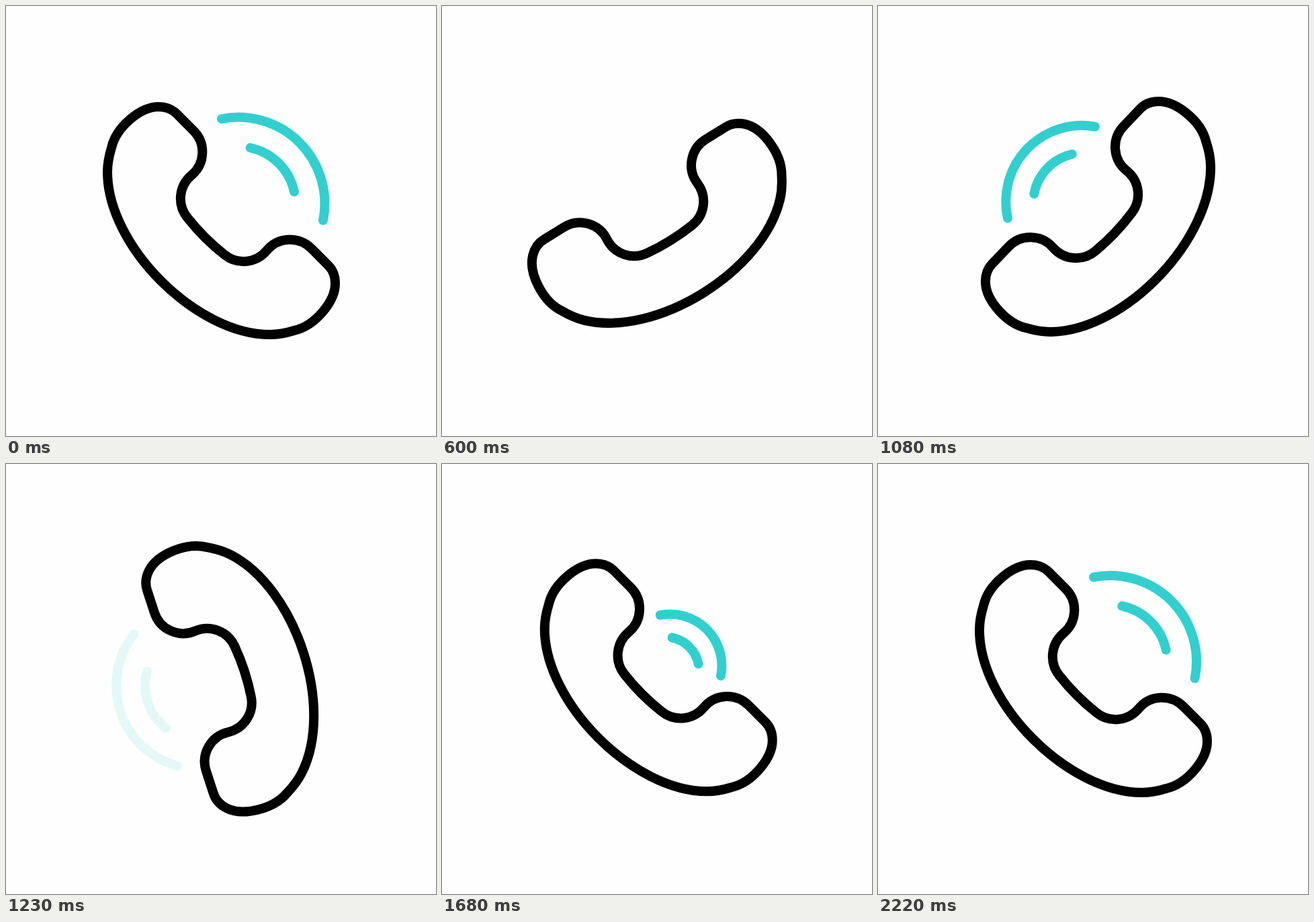
These frames come from a looping animation (640x640 px, 2.25 s). An HTML page:

```html
<!DOCTYPE html>
<html lang="en">
<head>
<meta charset="utf-8">
<title>Ringing phone</title>
<style>
  html, body { margin: 0; width: 100%; height: 100%; overflow: hidden; background: #fefefe; }
  svg { display: block; width: 100%; height: 100%; }
  path { fill: none; stroke-width: 14; stroke-linecap: round; stroke-linejoin: round; }
  #phone { stroke: #000; }
  #waves { stroke: #33cfcf; }
</style>
</head>
<body>
<svg viewBox="0 0 640 640">
  <g id="icon">
    <path id="phone" d="M254 160.4L278.8 185.2A45 45 0 0 1 276 252A45 45 0 0 0 270 315
      C285 334 306 355 325 370A45 45 0 0 0 388 364A45 45 0 0 1 454.8 361.2L479.6 386
      C486.6 393 490 402.8 490 413C490 440 460 476 429 483C416 487 405 489 393 489
      C283 489 151 357 151 247C151 235 153 224 157 211C164 180 200 150 227 150
      C237.2 150 247 153.4 254 160.4Z"/>
    <g id="waves"><path id="outer"/><path id="inner"/></g>
  </g>
</svg>
<script>
const LOOP = 2250;
// Delay from the first ring to the second, for each kind of motion.
const SPIN_GAP = 835, GROW_GAP = 870, SHAKE_GAP = 900;

const byId = id => document.getElementById(id);
const icon = byId('icon'), waves = byId('waves');
const progress = (t, start, length) => Math.min(1, Math.max(0, (t - start) / length));

// Three quarters of a turn: steep ease-in, then an ease-out that overshoots.
function spin(t) {
  const rise = progress(t, 0, 435);
  if (rise < 1) return 135 * rise ** 8.1;
  const left = 1 - progress(t, 435, 270), back = 1.70158;
  return 270 - 135 * left * left * ((back + 1) * left - back);
}

const shake = t => 6 * Math.sin(3 * Math.PI * progress(t, 600, 600));

const grow = t => t < 640 ? 1 : 1 - 0.67 * (1 - progress(t, 640, 760)) ** 2;

const fade = t => t < 500 ? 1 - progress(t, 360, 41) : progress(t, 680, 80);

// An arc mirrored in the icon's diagonal axis, scaled about a point on that axis.
function setWave(id, x, y, r, pivot, s) {
  const near = pivot + (x - 320 - pivot) * s;
  const far = pivot + (320 - y - pivot) * s;
  byId(id).setAttribute('d',
    `M${320 + near} ${320 - far}A${r * s} ${r * s} 0 0 1 ${320 + far} ${320 - near}`);
}

function draw(t) {
  const angle = spin(t) - spin(t - SPIN_GAP);
  const k = shake(t) + shake(t - SHAKE_GAP);
  icon.setAttribute('transform', `translate(${k} ${-k}) rotate(${angle} 321 319)`);

  const s = grow(t) * grow(t - GROW_GAP);
  setWave('outer', 321, 168, 128.5, 6, s);
  setWave('inner', 363.5, 211, 85, -13, s);
  waves.setAttribute('opacity', fade(t) * fade(t - SPIN_GAP));
}

function tick() {
  draw(performance.now() % LOOP);
  requestAnimationFrame(tick);
}
tick();
</script>
</body>
</html>
```
